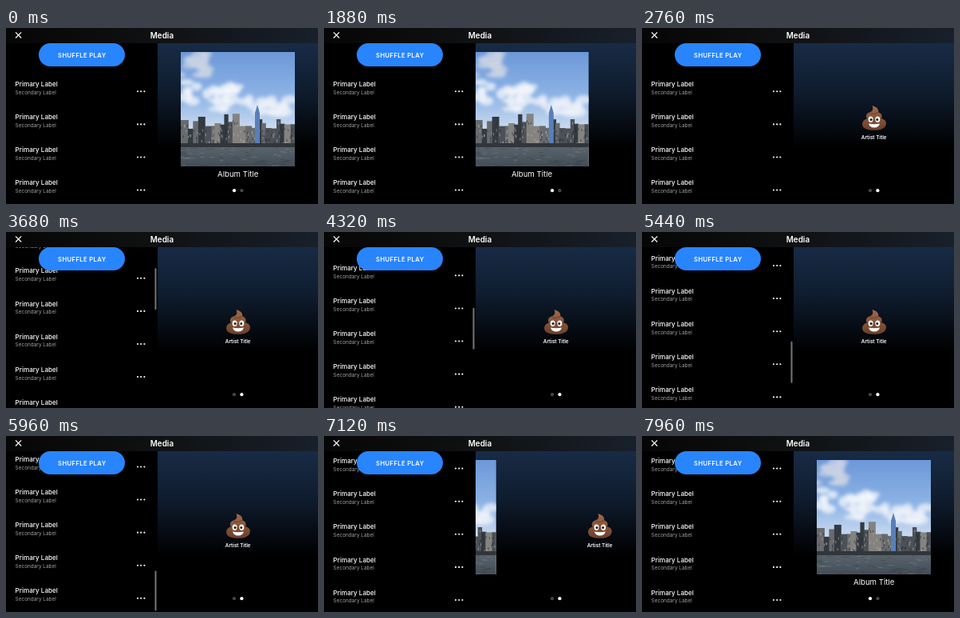
An HTML page that plays this animation: 391 by 220 pixels, repeating every 8 s.

```html
<!DOCTYPE html>
<html lang="en">
<head>
<meta charset="utf-8">
<title>Media</title>
<style>
  html, body { margin: 0; width: 100%; height: 100%; overflow: hidden; background: #000; }
  svg { display: block; width: 100vw; height: 100vh; }
  text { font-family: Inter, Roboto, sans-serif; fill: #fff; }
  .mid { text-anchor: middle; }
  .primary { font-size: 8.1px; font-weight: 500; }
  .secondary { font-size: 6.45px; fill: #a0a0a0; }
</style>
</head>
<body>
<svg viewBox="0 0 391 220">
  <defs>
    <linearGradient id="glow" x2="0" y2="1">
      <stop offset="0" stop-color="#182b45"/>
      <stop offset=".3" stop-color="#0f1c2e"/>
      <stop offset=".65" stop-color="#000"/>
    </linearGradient>
    <linearGradient id="bar">
      <stop offset="0" stop-color="#060606"/>
      <stop offset=".45" stop-color="#0f1011"/>
      <stop offset="1" stop-color="#18202b"/>
    </linearGradient>
    <linearGradient id="sky" x2="0" y2="1">
      <stop offset="0" stop-color="#6c98d8"/>
      <stop offset=".4" stop-color="#8fb5e6"/>
      <stop offset=".72" stop-color="#d6e2f0"/>
    </linearGradient>
    <linearGradient id="water" x2="0" y2="1">
      <stop offset="0" stop-color="#59636c"/>
      <stop offset="1" stop-color="#434d57"/>
    </linearGradient>
    <linearGradient id="brown" x2="0" y2="1">
      <stop offset="0" stop-color="#a06a4a"/>
      <stop offset="1" stop-color="#6b3f2a"/>
    </linearGradient>
    <filter id="soft" x="-20%" y="-20%" width="140%" height="140%"><feGaussianBlur stdDeviation="2.2"/></filter>
    <clipPath id="listBox"><rect y="18" width="190" height="202"/></clipPath>
    <clipPath id="pageBox"><rect x="190" y="19" width="201" height="201"/></clipPath>
    <clipPath id="photoBox"><rect x="219" y="30" width="143" height="143"/></clipPath>
  </defs>

  <rect width="391" height="220"/>
  <rect x="190" y="19" width="201" height="201" fill="url(#glow)"/>

  <g clip-path="url(#listBox)"><g id="list"></g></g>
  <rect id="thumb" x="186.5" width="2" rx="1" fill="#767676"/>

  <g clip-path="url(#pageBox)">
    <g id="pages">
      <g clip-path="url(#photoBox)">
        <rect x="219" y="30" width="143" height="143" fill="url(#sky)"/>
        <g id="clouds" filter="url(#soft)"></g>
        <g id="city"></g>
        <rect x="219" y="144" width="143" height="6" fill="#30363a"/>
        <rect x="219" y="149" width="143" height="24" fill="url(#water)"/>
        <g id="waves" stroke-width=".7" opacity=".5"></g>
      </g>
      <text class="mid" x="290.7" y="186.4" font-size="9.6">Album Title</text>

      <g transform="translate(201)">
        <path d="M288.5 97.2 C294 98.2 297 101.5 296.3 105.5 C300.5 106.5 301.5 110 300 113.2
          C305 114 306.8 118 305.6 121 C304.6 126 298 127.8 291 127.8 C283 127.8 277 126 276.2 121.5
          C275.5 117.5 278 114.5 281.8 113.5 C279.8 110 281.5 106.8 285 105.6 C289 104.4 290.4 101 288.5 97.2Z" fill="url(#brown)"/>
        <path d="M285 106.8 Q291 108.6 296 105.7 M282 114.3 Q291 116.4 299.8 113.4" fill="none" stroke="#57301f" stroke-width=".9" opacity=".65"/>
        <ellipse cx="286.6" cy="114.2" rx="3" ry="3.7" fill="#fff"/>
        <ellipse cx="295.3" cy="114.2" rx="3" ry="3.7" fill="#fff"/>
        <circle cx="287.1" cy="114.4" r="1.5" fill="#20150f"/>
        <circle cx="294.8" cy="114.4" r="1.5" fill="#20150f"/>
        <path d="M284 119.4 Q291 121 298 119.4 Q296.6 124.4 291 124.4 Q285.4 124.4 284 119.4Z" fill="#fff"/>
        <text class="mid" x="290.7" y="139.4" font-size="6.3" font-weight="600">Artist Title</text>
      </g>
    </g>
  </g>
  <circle id="dotA" cx="286" cy="203.2" r="2.1"/>
  <circle id="dotB" cx="295.4" cy="203.2" r="2.1"/>

  <rect x="41" y="19" width="108" height="29" rx="14.5" fill="#2885fd"/>
  <text class="mid" x="95.3" y="36.6" font-size="7.7" font-weight="600" letter-spacing=".35">SHUFFLE PLAY</text>

  <rect width="391" height="19" fill="url(#bar)"/>
  <path d="M12 5.3 L19.2 12.5 M19.2 5.3 L12 12.5" stroke="#fff" stroke-width="1.2"/>
  <text class="mid" x="195.4" y="12.6" font-size="9.9" font-weight="600">Media</text>
</svg>

<script>
const LOOP = 8000, PAGE = 201, ROW = 41.1, ROWS = 18, END = 573;
const $ = id => document.getElementById(id);

function add(parent, tag, attrs, label) {
  const el = document.createElementNS("http://www.w3.org/2000/svg", tag);
  for (const key in attrs) el.setAttribute(key, attrs[key]);
  if (label) el.textContent = label;
  $(parent).appendChild(el);
}

let seed = 7;
const rand = () => (seed = seed * 16807 % 2147483647) / 2147483647;
const between = (a, b) => a + (b - a) * rand();
const pick = list => list[Math.floor(rand() * list.length)];

function buildList() {
  for (let i = 0; i < ROWS; i++) {
    const y = 70 + i * ROW;
    add("list", "text", { x: 11.6, y: y + 2.9, class: "primary" }, "Primary Label");
    add("list", "text", { x: 11.6, y: y + 12.7, class: "secondary" }, "Secondary Label");
    for (let k = 0; k < 3; k++)
      add("list", "circle", { cx: 165 + 4.2 * k, cy: y + 9.3, r: 1.05, fill: "#fff" });
  }
}

function cloudBank(x, y, w, h, count, fill) {
  for (let i = 0; i < count; i++)
    add("clouds", "ellipse", {
      cx: x + between(-w, w), cy: y + between(-h, h),
      rx: between(5, 12), ry: between(3, 7), fill, opacity: .75
    });
}

function buildCity() {
  const tones = ["#343a41", "#4c5157", "#686b6e", "#85837f"];
  for (let x = 219; x < 362;) {
    const w = between(4, 9), y = between(107, 126);
    add("city", "rect", { x, y, width: w + 1, height: 148 - y, fill: pick(tones) });
    for (let i = 0; i < 6; i++)
      add("city", "rect", {
        x: x + rand() * (w - 1), y: between(y + 2, 144), width: 1.2, height: 3,
        fill: pick(["#b7b5ae", "#252b32"]), opacity: .55
      });
    x += w;
  }
  add("city", "path", { d: "M312 148 V106 L315 96 L318 106 V148Z", fill: "#597fb8" });
}

function buildWaves() {
  for (let i = 0; i < 70; i++)
    add("waves", "path", {
      d: `M${between(217, 358)} ${between(150, 173)} h${between(3, 10)}`,
      stroke: pick(["#87929b", "#2c353d"])
    });
}

buildList();
cloudBank(236, 46, 18, 15, 16, "#c9d3e4");
cloudBank(255, 80, 34, 12, 18, "#f4f7fb");
cloudBank(305, 98, 55, 9, 22, "#edf2f9");
buildCity();
buildWaves();

// Progress from 0 to 1 between two times.
const ramp = (t, from, to) => Math.min(1, Math.max(0, (t - from) / (to - from)));
const smooth = u => u * u * (3 - 2 * u);
const swipe = (t, from) => PAGE * smooth(ramp(t, from, from + 760));

// Drag, coast to a slow stop, then a second flick that bounces at the end.
function scroll(t) {
  const coast = 62 * ramp(t, 3220, 3680) ** 4 + 290 * (1 - Math.exp(-Math.max(0, t - 3680) / 500));
  const u = ramp(t, 5080, 5720);
  const bounce = Math.max(0, t - 5720) / 60;
  return coast + (END - coast) * u * u * (2 - u) + 30 * bounce * Math.exp(-bounce);
}

function draw(t) {
  const shift = swipe(t, 1695) - swipe(t, 6860);
  $("pages").setAttribute("transform", `translate(${-shift})`);
  const second = shift > PAGE / 2;
  $("dotA").setAttribute("fill", second ? "#474747" : "#fff");
  $("dotB").setAttribute("fill", second ? "#fff" : "#474747");

  const y = scroll(t), over = Math.max(0, y - END);
  $("list").setAttribute("transform", `translate(0 ${-y})`);
  $("thumb").setAttribute("y", 30.3 + .2375 * Math.min(y, END) + over);
  $("thumb").setAttribute("height", 52 - over);
  $("thumb").setAttribute("opacity", ramp(t, 3200, 3320) - ramp(t, 6200, 6520));
}

const start = performance.now();
function tick() {
  draw((performance.now() - start) % LOOP);
  requestAnimationFrame(tick);
}
draw(0);
requestAnimationFrame(tick);
</script>
</body>
</html>
```
